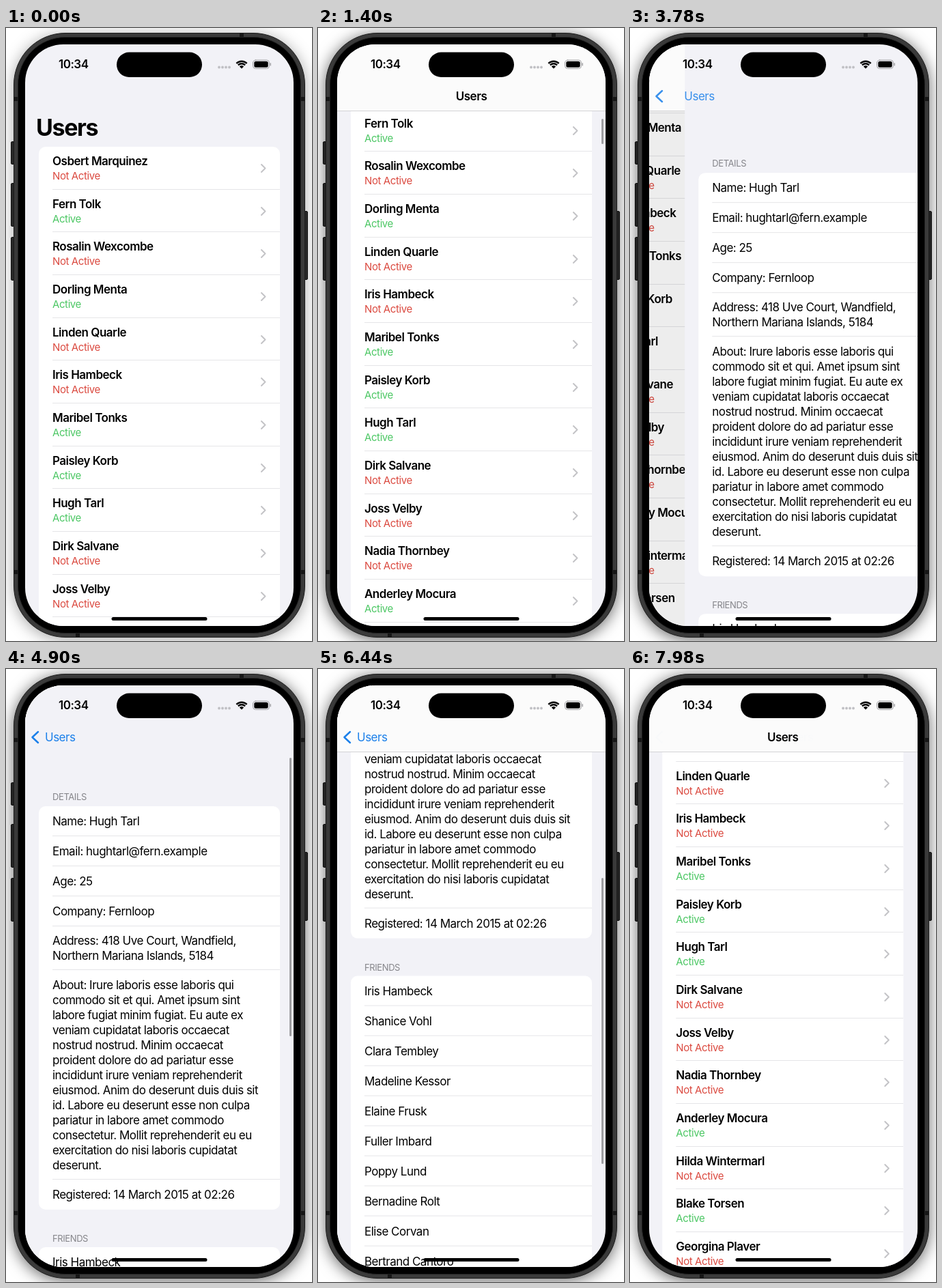
These frames come from a looping animation (448x898 px, 8 s). An HTML page:

```html
<!DOCTYPE html>
<html lang="en">
<head>
<meta charset="utf-8">
<title>Users</title>
<style>
html, body { margin: 0; width: 100%; height: 100%; overflow: hidden; background: #fff; }
body { position: relative; font: 17px/22px Inter, Roboto, sans-serif; letter-spacing: -.5px; color: #000; }
div, svg { position: absolute; box-sizing: border-box; }
.text { white-space: pre; }
.button { background: #303030; border: 1px solid #151515; border-radius: 2px; }
.body { left: 11px; top: 7px; width: 427px; height: 886px; border-radius: 76px; background: #3a3a3a; border: 1px solid #1c1c1c; }
.band { background: #161616; }
.bezel { left: 17px; top: 13px; width: 415px; height: 874px; border-radius: 70px; background: #000; border: 1px solid #222; }
.screen { left: 28px; top: 0; width: 393px; height: 898px; clip-path: inset(24px 0 22px round 56px); }
.page { inset: 0; background: #f2f2f7; }
.content { inset: 0; }
.card { left: 20px; width: 353px; border-radius: 10px; background: #fff; overflow: hidden; }
.row { left: 0; width: 100%; }
.row:not(:last-child)::after { content: ""; position: absolute; left: 20px; right: 0; bottom: 0; height: 1px; background: #e5e5e8; }
.name, .title { font-weight: 600; }
.status { font-size: 15px; letter-spacing: -.4px; color: #db4a40; }
.status.active { color: #4cc764; }
.header { font-size: 13px; letter-spacing: -.4px; color: #85858a; }
.dim { inset: 0; background: #000; }
.bar { left: 0; top: 0; width: 100%; height: 122px; background: #fbfbfb; border-bottom: 1px solid #d3d3d6; }
.scroller { left: 387px; width: 3px; border-radius: 2px; background: #9d9da0; }
.large { left: 0; top: 121px; width: 100%; height: 60px; overflow: hidden; }
.large .text { left: 16px; top: 5px; font-size: 34px; line-height: 40px; font-weight: 700; letter-spacing: -1.4px; }
.title { width: 100%; text-align: center; }
.back { inset: 0; color: #1c80ea; }
.overlay { left: 0; top: 0; }
</style>
</head>
<body>
<script>
const STEP = 70, LOOP = 8000;
const PUSH = 3570, POP = 7550, WIDTH = 393;
const TITLE_HEIGHT = 52, ROW = 188 / 3, SELECTED = 8;

const users = ["Osbert Marquinez", "Fern Tolk", "Rosalin Wexcombe", "Dorling Menta", "Linden Quarle",
  "Iris Hambeck", "Maribel Tonks", "Paisley Korb", "Hugh Tarl", "Dirk Salvane", "Joss Velby",
  "Nadia Thornbey", "Anderley Mocura", "Hilda Wintermarl", "Blake Torsen", "Georgina Plaver"];
const activeUsers = [1, 3, 6, 7, 8, 12, 14];

const details = ["Name: Hugh Tarl", "Email: hughtarl@fern.example", "Age: 25", "Company: Fernloop",
  "Address: 418 Uve Court, Wandfield,\nNorthern Mariana Islands, 5184",
  `About: Irure laboris esse laboris qui
commodo sit et qui. Amet ipsum sint
labore fugiat minim fugiat. Eu aute ex
veniam cupidatat laboris occaecat
nostrud nostrud. Minim occaecat
proident dolore do ad pariatur esse
incididunt irure veniam reprehenderit
eiusmod. Anim do deserunt duis duis sit
id. Labore eu deserunt esse non culpa
pariatur in labore amet commodo
consectetur. Mollit reprehenderit eu eu
exercitation do nisi laboris cupidatat
deserunt.`,
  "Registered: 14 March 2015 at 02:26"];

const friends = ["Iris Hambeck", "Shanice Vohl", "Clara Tembley", "Madeline Kessor", "Elaine Frusk",
  "Fuller Imbard", "Poppy Lund", "Bernadine Rolt", "Elise Corvan", "Bertrand Cantoro",
  "Garrick Stole", "Duncan Ostrey", "Magnusson Kendrel"];

function add(parent, className, style = {}) {
  const el = document.createElement("div");
  el.className = className;
  for (const key in style) {
    const value = style[key];
    el.style[key] = typeof value === "number" && key !== "opacity" ? value + "px" : value;
  }
  return parent.appendChild(el);
}

// y is the middle of the first line
function text(parent, className, left, y, string) {
  const el = add(parent, "text " + className, { left, top: y - 11 });
  el.textContent = string;
  return el;
}

function svg(parent, markup) {
  parent.insertAdjacentHTML("beforeend",
    `<svg class="overlay" width="448" height="898" fill="none" stroke-linecap="round" stroke-linejoin="round">${markup}</svg>`);
}

function addPage(parent) {
  const page = add(parent, "page");
  return { page, content: add(page, "content"), dim: add(page, "dim", { opacity: 0 }),
    bar: add(page, "bar"), scroller: add(page, "scroller") };
}

function addCard(parent, top, strings) {
  const card = add(parent, "card", { top });
  let y = 0;
  for (const string of strings) {
    const lines = string.split("\n").length;
    const height = lines === 1 ? 44 : lines * 22 + (lines > 2 ? 21 : 20);
    const row = add(card, "row", { top: y, height });
    text(row, "", 20, lines === 2 ? 21 : 22, string);
    y += height;
  }
  card.style.height = y + "px";
}

// Phone
const body = document.body;
for (const [left, top, height] of [[7, 166, 34], [7, 227, 64], [7, 306, 64], [436, 268, 101]])
  add(body, "button", { left, top, width: 6, height });
const shell = add(body, "body");
for (const [left, top, width, height] of [[12, 101, 6, 6], [431, 101, 6, 6], [12, 794, 6, 6], [431, 794, 6, 6], [342, 8, 6, 6], [102, 886, 6, 6]])
  add(body, "band", { left, top, width, height });
add(body, "bezel");
const screen = add(body, "screen");

// List page
const list = addPage(screen);
const listCard = add(list.content, "card", { top: 174, height: ROW * users.length });
const rows = users.map((user, i) => {
  const row = add(listCard, "row", { top: i * ROW, height: ROW });
  const active = activeUsers.includes(i);
  text(row, "name", 20, 21, user);
  text(row, "status" + (active ? " active" : ""), 20, 43, active ? "Active" : "Not Active");
  svg(row, `<path d="M326 26l5.5 5.5-5.5 5.5" stroke="#c4c4c7" stroke-width="2"/>`);
  return row;
});
const large = add(list.page, "large");
const largeTitle = add(large, "text");
largeTitle.textContent = "Users";

// Detail page
const detail = addPage(screen);
text(detail.content, "header", 40, 187, "DETAILS");
addCard(detail.content, 201, details);
text(detail.content, "header", 40, 834, "FRIENDS");
addCard(detail.content, 847, friends);

// Navigation and status bars
const title = text(screen, "title", 0, 100, "Users");
const back = add(screen, "back");
svg(back, `<path d="M19 92l-8.5 8 8.5 8" stroke="#1c80ea" stroke-width="2.5"/>`);
const backLabel = text(back, "", 29, 100, "Users");
text(screen, "name", 49, 53, "10:34");

const arc = r => {
  const d = r * Math.SQRT1_2;
  return `M${345 - d} ${59.5 - d}A${r} ${r} 0 0 1 ${345 + d} ${59.5 - d}`;
};
svg(body, `
  <rect x="162" y="35.5" width="125" height="36.5" rx="18.2" fill="#000"/>
  ${[312, 317, 322, 327].map(x => `<circle cx="${x}" cy="57.5" r="1.9" fill="#c0c0c4"/>`).join("")}
  <g stroke="#000" stroke-width="2.4" stroke-linecap="butt"><path d="${arc(10.8)}"/><path d="${arc(7.2)}"/></g>
  <path d="${arc(4.4)}L345 59.5z" fill="#000"/>
  <rect x="361.5" y="47" width="24" height="12.5" rx="4" stroke="#a0a0a3"/>
  <rect x="363.3" y="48.8" width="20.4" height="8.9" rx="2.5" fill="#000"/>
  <path d="M387.3 51.8v3" stroke="#a0a0a3" stroke-width="1.4"/>
  <rect x="154.5" y="863" width="140" height="5" rx="2.5" fill="#000"/>`);

// Motion
const clamp = x => Math.min(1, Math.max(0, x));
const easeOut = (t, start, end, power) => 1 - (1 - clamp((t - start) / (end - start))) ** power;
const springRest = ms => {
  const x = Math.max(0, ms) * .0168;
  return (1 + x) * Math.exp(-x);
};
const within = (t, start, end) => t >= start && t < end;

function setScroller(el, visible, top, height, opacity = 1) {
  el.style.opacity = visible ? opacity : 0;
  el.style.top = top + "px";
  el.style.height = height + "px";
}

function render(t) {
  const pushed = t < POP ? 1 - springRest(t - PUSH) : springRest(t - POP);
  const away = 1 - pushed;

  // The list makes room for the tall bar while the detail page is open.
  const listScroll = 118 * easeOut(t, 840, 1400, 2) + 171 * easeOut(t, 1890, 2170, 2)
    - (within(t, PUSH, POP) ? TITLE_HEIGHT : 0);
  const detailScroll = 180 * easeOut(t, 4900, 5250, 2) + (t >= 5530 ? 2 : 0)
    + 416 * easeOut(t, 6300, 7140, 4);
  const collapsed = clamp((listScroll - 42) / 10);

  list.page.style.transform = `translateX(${-.3 * WIDTH * pushed}px)`;
  list.content.style.transform = `translateY(${-listScroll}px)`;
  list.dim.style.opacity = .08 * pushed;
  list.bar.style.opacity = collapsed;
  largeTitle.style.transform = `translateY(${-listScroll}px)`;
  rows[SELECTED].style.background = within(t, 3500, 3640) ? "#d9d9dd" : "";
  setScroller(list.scroller, within(t, 910, 2170), 126 + .06 * listScroll, 37);

  detail.page.style.visibility = pushed > .0001 ? "visible" : "hidden";
  detail.page.style.transform = `translateX(${WIDTH * away}px)`;
  const drop = t < POP ? 84 * away : 0;
  detail.content.style.transform = `translateY(${drop - detailScroll}px)`;
  detail.bar.style.opacity = clamp((detailScroll - 42) / 10);
  const shrink = clamp(detailScroll / TITLE_HEIGHT);
  const track = detailScroll < TITLE_HEIGHT ? 130 + 5.6 * shrink : 110 + .493 * detailScroll;
  setScroller(detail.scroller, within(t, 4900, 6090) || within(t, 6370, 7140),
    track, 408 + 11 * shrink, within(t, 6020, 6090) ? .5 : 1);

  title.style.opacity = collapsed * clamp(1 - 2 * pushed);
  title.style.transform = `translateX(${-145 * pushed}px)`;
  back.style.opacity = pushed * (within(t, 7420, POP) ? .35 : 1);
  backLabel.style.transform = `translateX(${168 * away}px)`;
  shell.style.boxShadow = `0 3px 22px rgba(0,0,0,${t < 910 ? .35 : .6})`;
}

function frame(now) {
  render(Math.floor(now % LOOP / STEP) * STEP);
  requestAnimationFrame(frame);
}
render(0);
requestAnimationFrame(frame);
</script>
</body>
</html>
```
